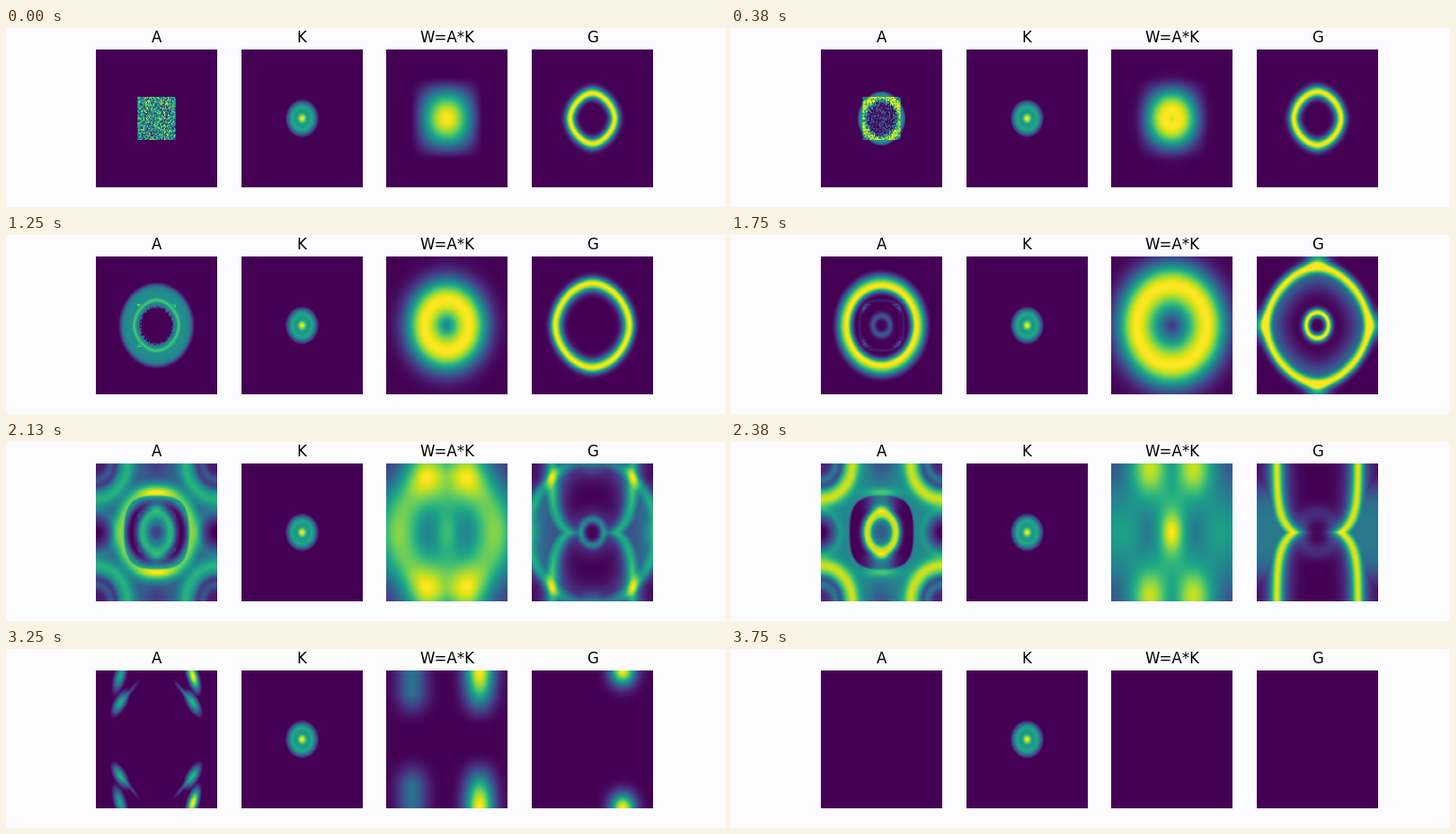
A matplotlib script for the animation above (3870 ms loop, 800x200 px).

```python
import numpy as np
import matplotlib.pyplot as plt
from matplotlib.animation import FuncAnimation

FRAMES, LOOP_MS = 31, 3870
SPREAD, FILL, SPLIT, MERGE, DECAY, DEAD = 6, 10, 14, 19, 26, 30
N = 128
plt.rcParams["font.family"] = "DejaVu Sans"

# Every panel spans -1..1 on both axes.
axis = (np.arange(N) - N / 2 + 0.5) / (N / 2)
U, V = np.meshgrid(axis, axis)
AU, AV = np.abs(U), np.abs(V)
RHO = np.hypot(U, V)
CORNER = np.hypot(1 - AU, 1 - AV)
SIDE = np.hypot(1 - AU, AV)

rng = np.random.default_rng(4)
NOISE = np.zeros((N, N))
NOISE[44:84, 44:84] = rng.random((40, 40))


def bell(x, mid, width):
    return np.exp(-(((x - mid) / width) ** 2) / 2)


def shell(r, mid, inner, outer):
    """Bell with its own width on each side of the peak."""
    return bell(r, mid, np.where(r < mid, inner, outer))


def step(x, lo, hi):
    """Smooth 0..1 step; falls instead when lo > hi."""
    t = np.clip((x - lo) / (hi - lo), 0, 1)
    return t * t * (3 - 2 * t)


def norm(p):
    """Superellipse radius: a diamond for p < 2, a square for p > 2."""
    return (AU**p + AV**p) ** (1 / p)


def spot(u, v, su, sv):
    """Gaussian spot mirrored into all four quadrants."""
    return bell(AU, u, su) * bell(AV, v, sv)


def streak(u, v, su, sv, slant, left, right):
    """Slanted mirrored streak with its own strength on each side."""
    g = bell(AU + slant * (AV - v), u, su) * bell(AV, v, sv)
    return np.clip(1.2 * g - 0.2, 0, 1) * np.where(U < 0, left, right)


def mix(a, b, n, start, end):
    return a + (b - a) * np.clip((n - start) / (end - start), 0, 1)


KERNEL = (bell(RHO, 0, 0.058) + 0.57 * bell(RHO, 0.165, 0.057)) * step(RHO, 0.29, 0.25)


# A: cell states
def seeded(n):
    growth = 2 * bell(norm(1.85), 0.335, 0.056) - 1
    return np.clip(NOISE + 0.17 * n * growth, 0, 1)


def disc():
    hole = step(RHO + 0.05 * (NOISE - 0.5), 0.262, 0.285)
    body = (0.42 + 0.1 * bell(RHO, 0.45, 0.07)) * step(RHO, 0.64, 0.54)
    rim = 0.3 * bell(norm(1.85), 0.365, 0.022)
    specks = 0.55 * NOISE * (NOISE > 0.6) * step(RHO, 0.385, 0.41)
    return hole * (body + rim) + specks


def ring():
    band = 0.64 * shell(RHO, 0.575, 0.055, 0.08)
    skirt = 0.36 * step(RHO, 0.42, 0.56) * step(RHO, 0.83, 0.66)
    ghost = 0.35 * NOISE * bell(RHO, 0.38, 0.02) + 0.08 * bell(norm(3), 0.36, 0.012)
    return band + skirt + ghost + 0.27 * bell(RHO, 0.14, 0.035)


def web():
    arcs = 0.42 * bell(CORNER, 0.52, 0.09) + 0.25 * bell(CORNER, 0.24, 0.05)
    bars = 0.25 * spot(0, 0.58, 0.2, 0.05) + 0.12 * bell(SIDE, 0.32, 0.05)
    gaps = 0.32 * step(CORNER, 0.42, 0.3) + 0.45 * bell(SIDE, 0, 0.16)
    outer = 0.42 + arcs + bars - gaps - 0.18 * spot(0, 1, 0.15, 0.18)
    eye = np.hypot(U / 0.25, V / 0.29)
    inner = 0.85 * bell(eye, 1, 0.2) + 0.36 * step(eye, 1, 0.7) - 0.1 * bell(eye, 0, 0.3)
    inner += 0.36 * bell(U, 0, 0.15) * step(AV, 0.27, 0.38)
    wall = step(norm(3), 0.51, 0.55)
    return np.clip(wall * outer + (1 - wall) * inner, 0, 1)


def shreds():
    return (streak(0.60, 0.92, 0.065, 0.16, 0.3, 0.58, 1.0)
            + streak(0.60, 0.53, 0.07, 0.12, 0.5, 0.62, 0.65)
            + streak(0.43, 0.70, 0.03, 0.10, 0.9, 0.2, 0.25))


DISC, RING, WEB, SHREDS = disc(), ring(), web(), shreds()


def cells(n):
    if n <= SPREAD:
        return seeded(n)
    if n > DECAY:
        return np.clip(SHREDS - 0.27 * (n - DECAY), 0, 1)
    a = mix(seeded(SPREAD), DISC, n, SPREAD, FILL)
    a = mix(a, RING, n, FILL, SPLIT) if n > FILL else a
    a = mix(a, WEB, n, SPLIT, MERGE)
    return mix(a, SHREDS, n, MERGE, DECAY)


# W: weighted neighbourhoods
def blurred_box():
    g = np.cos(np.pi / 2 * np.clip(axis / 0.6, -1, 1)) ** 1.4
    return np.outer(g, g)


def weight_web():
    w = 0.47 + 0.36 * spot(0, 0, 0.13, 0.2) + 0.45 * spot(0.36, 0.92, 0.2, 0.28)
    w += 0.17 * bell(U, 0, 0.16) * np.exp(-((V / 0.65) ** 4))
    w += 0.1 * spot(0.8, 0, 0.2, 0.25)
    return w - 0.2 * spot(1, 1, 0.22, 0.3) - 0.08 * spot(0.4, 0, 0.12, 0.25)


def weight_last():
    fall = np.cos(np.pi / 2 * np.clip((1 - AV) / 0.84, 0, 1)) ** 2
    left = 0.36 * bell(U, -0.57, 0.17) * np.clip(1.6 * fall, 0, 1)
    return bell(U, 0.54, 0.165) * fall + left


BOX, W_WEB, W_LAST = blurred_box(), weight_web(), weight_last()


def weights(n):
    wave = shell(RHO, 0.15 + 0.0022 * n**2, 0.22 + 0.006 * n, 0.18 + 0.004 * n)
    w = mix(BOX, wave, n, 0, SPREAD)
    w = mix(w, W_WEB, n, SPLIT, MERGE)
    w = mix(w, W_LAST, n, MERGE, DECAY)
    return w ** (1 + 0.2 * max(n - DECAY, 0)) * (n < DEAD)


# G: growth
def front(n):
    """Accelerating ring, with a small second ring born inside it."""
    late = step(n, 11, 14)
    r = norm(2 - 0.25 * abs(np.cos(np.pi * n / 14)))
    mid = 0.365 + 0.00248 * n**2
    main = shell(r, mid, 0.055 + 0.002 * n, 0.06)
    glow = 0.4 * late * shell(r, mid, 0.2, 0.06)
    core = late * bell(RHO, 0.185 * late, 0.042)
    edge = 0.5 * late * (spot(0, 1, 0.13, 0.1) + spot(1, 0, 0.1, 0.13))
    return np.clip(np.maximum(main, glow) + core + edge, 0, 1)


def growth_web():
    pinch = np.exp(-AV / 0.2)
    mid = 0.67 - 0.27 * pinch
    band = 0.7 * bell(AU, mid, 0.07 + 0.03 * pinch) + 0.3 * bell(AU, mid, 0.17)
    flank = 0.42 * step(AU, mid, mid + 0.1) * np.exp(-((V / 0.7) ** 4))
    return np.maximum(band, flank) + 0.13 * bell(RHO, 0.28, 0.09)


G_WEB = growth_web()
TIPS = bell(U, 0.50, 0.145) * bell(AV, 1, 0.15)


def growth(n):
    g = mix(front(n), G_WEB, n, SPLIT, MERGE)
    g = mix(g, TIPS, n, MERGE, DECAY)
    return g ** (1 + 0.3 * max(n - DECAY, 0)) * (n < DEAD)


def scaled(field):
    peak = field.max()
    return field / peak if peak > 0 else field


fig, axes = plt.subplots(1, 4, figsize=(8, 2), dpi=100, facecolor="#fcfcfe")
images = []
for ax, title in zip(axes, ["A", "K", "W=A*K", "G"]):
    images.append(ax.imshow(KERNEL, cmap="viridis", vmin=0, vmax=1, aspect="auto"))
    ax.set_title(title, fontsize=12)
    ax.axis("off")


def update(n):
    for i, field in ((0, cells), (2, weights), (3, growth)):
        images[i].set_data(scaled(field(n)))
    return images


anim = FuncAnimation(fig, update, frames=FRAMES, interval=LOOP_MS / FRAMES, repeat=True)
plt.show()
```
